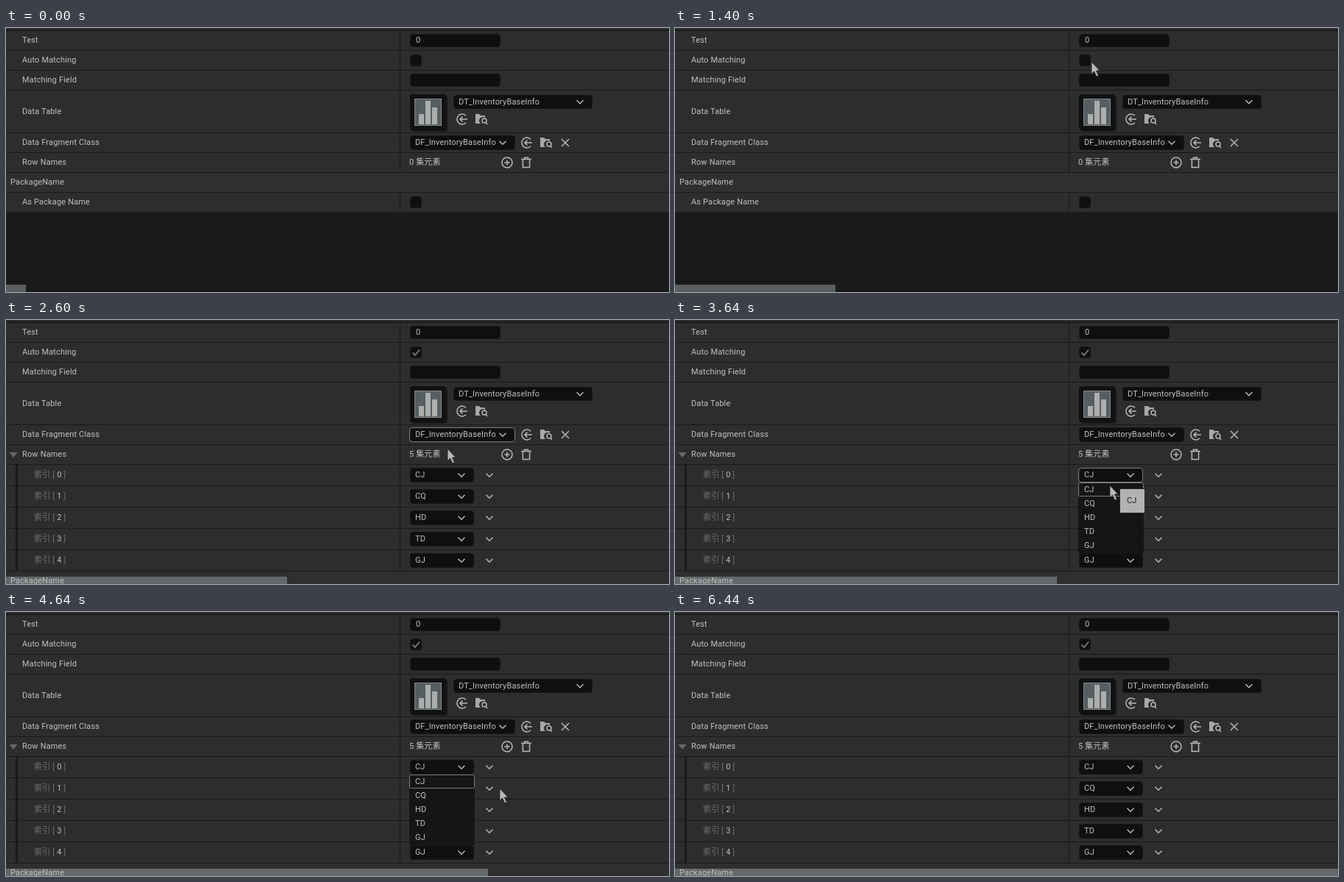
Recreate the animation shown at these times as an HTML page. Size 901x359 px, loop 6640 ms.

```html
<!DOCTYPE html>
<html lang="en">
<head>
<meta charset="utf-8">
<title>Details panel</title>
<style>
html, body { margin: 0; width: 100%; height: 100%; overflow: hidden; background: #1a1a1a; }
svg { display: block; width: 901px; height: 359px; }
text {
  font: 11px Roboto, "Noto Sans CJK SC", "Noto Sans CJK", sans-serif;
  letter-spacing: .15px; fill: #c0c0c0; white-space: pre;
}
.dim { fill: #707070; }
.box { fill: #0f0f0f; stroke: #161616; }
.icon { fill: none; stroke: #b8b8b8; stroke-width: 1.5; }
.focus { fill: none; stroke: #7c7c7c; }
</style>
</head>
<body>
<svg id="stage" viewBox="0 0 901 359"></svg>
<script>
const LOOP = 6640, STEP = 200, COUNT = 33;
const NAMES = ['CJ', 'CQ', 'HD', 'TD', 'GJ'];

const rect = (x, y, w, h, fill, extra = '') =>
  `<rect x="${x}" y="${y}" width="${w}" height="${h}" fill="${fill}" ${extra}/>`;
const text = (x, y, s, extra = '') => `<text x="${x}" y="${y}" ${extra}>${s}</text>`;
const box = (x, y, w, h, cls = 'box') =>
  `<rect class="${cls}" x="${x + .5}" y="${y + .5}" width="${w - 1}" height="${h - 1}" rx="3.5"/>`;
const icon = (x, y, d) => `<path class="icon" transform="translate(${x} ${y})" d="${d}"/>`;
const group = (id, body) => `<g id="${id}">${body}</g>`;

const chevron = (x, y) => icon(x, y, 'M-4.5-2.3L0 2.3L4.5-2.3');
const ring = 'M7 0A7 7 0 1 1-7 0A7 7 0 1 1 7 0Z';
const useIcon = (x, y) =>
  icon(x, y, 'M5-4.8A7 7 0 1 0 5 4.8M7 0H-3M.5-3.5L-3 0L.5 3.5');
const findIcon = (x, y) =>
  `<path transform="translate(${x} ${y})" fill="#a8a8a8" d="M-8-7H-3L-1-5H5V-2A5 5 0 0 0-1 6H-8Z"/>` +
  icon(x, y, 'M7 2A3 3 0 1 1 1 2A3 3 0 1 1 7 2M6 4.5L8 7');
const plusIcon = (x, y) => icon(x, y, ring + 'M-3.5 0H3.5M0-3.5V3.5');
const binIcon = (x, y) => icon(x, y, 'M-7-4.5H7M-2.5-4.5V-6.8H2.5V-4.5M-4.6-4.5V6.5H4.6V-4.5');
const combo = (x, y, w, h, label, cx) =>
  box(x, y, w, h) + text(x + 7, y + 13, label) + chevron(cx, y + h / 2);

// Property row with its bottom line and optional column divider
function row(y, h, label, split = true) {
  return rect(0, y, 901, h, split ? '#2d2d2d' : '#2f2f2f') +
    rect(0, y + h - 1, 901, 1, '#1a1a1a') +
    (split ? rect(535, y, 1, h, '#1a1a1a') : '') +
    text(split ? 22 : 6, y + Math.floor(h / 2) + 3, label);
}

function thumbnail() {
  const bars = [[561, 117], [570, 99], [579, 108]]
    .map(([x, y]) => rect(x, y, 7, 131 - y, '#adadad')).join('');
  return rect(551, 92, 49, 49, '#181818', 'rx="4"') +
    rect(549, 90, 49, 49, '#111', 'rx="4"') +
    rect(555.5, 96.5, 36, 36, '#565e62', 'stroke="#858989"') + bars;
}

const header = rect(0, 0, 901, 3, '#2d2d2d') + rect(0, 2, 901, 2, '#1a1a1a') +
  row(4, 27, 'Test') + row(31, 27, 'Auto Matching') + row(58, 27, 'Matching Field') +
  row(85, 58, 'Data Table') + row(143, 27, 'Data Fragment Class') + row(170, 27, 'Row Names') +
  box(549, 8, 123, 18) + text(557, 20, '0') +
  box(549, 36, 16, 16) + box(549, 62, 123, 18) + thumbnail() +
  combo(608, 91, 189, 19, 'DT_InventoryBaseInfo', 780) + useIcon(620, 124) + findIcon(646, 124) +
  combo(549, 146, 143, 20, 'DF_InventoryBaseInfo', 675) + useIcon(708, 156) + findIcon(734, 156) +
  icon(760, 156, 'M-5-5L5 5M5-5L-5 5') + plusIcon(681, 183) + binIcon(707, 183);

const closed = text(548, 186, '0 集元素') + row(197, 27, 'PackageName', false) +
  row(224, 27, 'As Package Name') + box(549, 229, 16, 16);

const items = NAMES.map((name, i) => {
  const y = 197 + 29 * i;
  return row(y, 29, '') +
    text(38, y + 17, `索引 [ <tspan fill="#c0c0c0">${i}</tspan> ]`, 'class="dim"') +
    combo(549, y + 4, 87, 20, name, 619) + chevron(657, y + 14);
}).join('');

const opened = '<path d="M4.500 180H15.500L10 187Z" fill="#686868"/>' +
  '<path d="M552.500 44.500L556 48L562 40.500" fill="none" stroke="#747474" stroke-width="2"/>' +
  text(548, 186, '5 集元素') + items +
  rect(13, 197, 3, 144, '#1a1a1a') + row(342, 27, '', false);

const menu = rect(548, 221, 89, 96, '#151515') + rect(548, 240, 89, 19, '#5a5d60', 'id="hover"') +
  rect(548.5, 221.5, 88, 18, 'none', 'stroke="#7c7c7c" rx="1"') +
  NAMES.map((name, i) => text(556, 234 + 19 * i, name)).join('');

const tip = rect(604.5, 229.5, 34, 33, '#b2b2b2', 'stroke="#2a2a2a"') +
  text(614, 249, 'CJ', 'style="fill:#202020"');

document.getElementById('stage').innerHTML =
  rect(0, 0, 901, 359, '#1a1a1a') + header +
  group('closed', closed) + group('opened', opened) +
  group('classFocus', box(548, 146, 144, 20, 'focus')) +
  group('rowFocus', box(548, 201, 88, 20, 'focus')) +
  group('menu', menu) + group('tip', tip) +
  rect(0, 349, 0, 10, '#8e9498', 'id="bar" fill-opacity=".56"') +
  group('footer', text(6, 358, 'PackageName')) +
  `<path id="cursor" d="M0 0V16.500L3.600 13L6.800 20L9.500 18.800L6.500 12H11.200Z"
    fill="#b8b8b8" stroke="#202020" stroke-width=".8"/>`;

// Pointer stops: step, x, y
const PATH = [
  [2, 724, 338], [3, 690, 250], [4, 640, 150], [5, 600, 80], [6, 570, 50], [7, 566, 46],
  [8, 557, 43], [12, 557, 43], [13, 600, 175], [14, 650, 190], [15, 729, 205], [16, 660, 211],
  [17, 604, 212], [18, 591, 225], [20, 586, 238], [21, 582, 248], [22, 590, 252], [23, 671, 240],
  [24, 640, 232], [25, 560, 225], [26, 456, 220], [27, 640, 275], [28, 847, 345]
];

function pointer(n) {
  const k = PATH.findIndex(p => p[0] >= n);
  if (k < 0 || n < PATH[0][0]) return null;
  const b = PATH[k], a = PATH[k - 1] || b;
  const f = a === b ? 1 : (n - a[0]) / (b[0] - a[0]);
  return [a[1] + (b[1] - a[1]) * f, a[2] + (b[2] - a[2]) * f];
}

const el = id => document.getElementById(id);
const show = (id, on) => { el(id).style.display = on ? '' : 'none'; };

function draw(n) {
  show('closed', n < 9);
  show('opened', n >= 9);
  show('footer', n >= 9);
  show('classFocus', n === 13);
  show('rowFocus', n === 17 || n === 18);
  show('menu', n >= 17 && n <= 23);
  show('hover', n >= 20 && n <= 22);
  show('tip', n === 18);
  el('bar').setAttribute('width', Math.round(901 * (n + 1) / COUNT));
  const p = pointer(n);
  show('cursor', p);
  if (p) el('cursor').setAttribute('transform', `translate(${p})`);
}

// Step 17 holds 40 ms longer than the rest
const stepAt = t => t < 3640 ? Math.min(17, Math.floor(t / STEP)) : Math.floor((t - 40) / STEP);

const start = performance.now();
let last = -1;
function tick() {
  const n = stepAt((performance.now() - start) % LOOP);
  if (n !== last) draw(last = n);
  requestAnimationFrame(tick);
}
tick();
</script>
</body>
</html>
```
